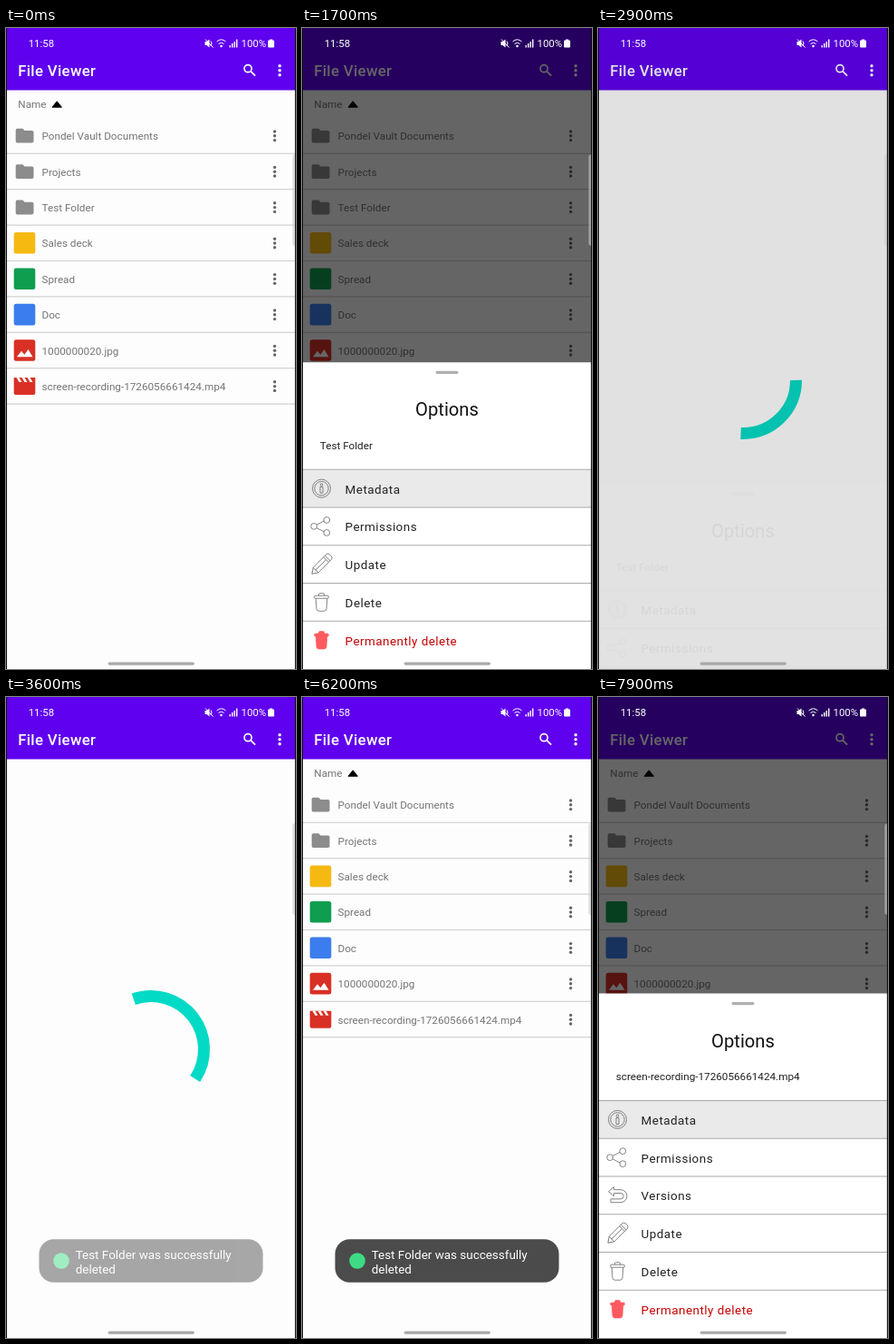
These frames come from a looping animation (320 px wide and 706 px high, 8 s). An HTML page:

```html
<!DOCTYPE html>
<html lang="en">
<head>
<meta charset="utf-8">
<title>File Viewer</title>
<style>
  html, body { margin: 0; width: 100%; height: 100%; overflow: hidden; background: #fdfdfd; }
  svg { display: block; width: 100vw; height: 100vh; }
  text { font-family: Roboto, sans-serif; font-size: 11.73px; white-space: pre; }
  .title { font-size: 16.8px; font-weight: 500; letter-spacing: .32px; }
  .status text { font-size: 11.4px; }
  .heading { font-size: 20.2px; text-anchor: middle; }
  .option { font-size: 13.45px; letter-spacing: .47px; }
  .toast text { font-size: 13.45px; }
  .line { fill: none; stroke: #777; stroke-width: .9; stroke-linejoin: round; }
</style>
</head>
<body>
<svg viewBox="0 0 320 706" preserveAspectRatio="none">
  <rect width="320" height="706" fill="#fdfdfd"/>
  <rect width="320" height="68.5" fill="#5f00ee"/>
  <g fill="#fff">
    <text class="title" x="13.2" y="53">File Viewer</text>
    <g fill="none" stroke="#fff" stroke-width="1.7">
      <circle cx="267" cy="44.7" r="4"/><path d="M270 47.7l5 5"/>
    </g>
    <g id="menu"></g>
  </g>
  <g id="fullList"></g>
  <g id="shortList"></g>
  <path id="spinner" fill="none" stroke="#03dac5" stroke-width="13"/>
  <rect id="scrim" width="320" height="706"/>
  <g id="folderSheet"></g>
  <g id="videoSheet"></g>

  <g id="toast" class="toast" fill="#fff">
    <rect x="36.5" y="597.3" width="247" height="47.5" rx="16" fill="#4b4b4b"/>
    <circle cx="61" cy="621" r="8.8" fill="#3ddc84"/>
    <text x="76.7" y="619">Test Folder was successfully</text>
    <text x="76.7" y="634.5">deleted</text>
  </g>

  <g class="status" fill="#fff">
    <text x="24.7" y="21">11:58</text>
    <text x="259.5" y="21">100%</text>
    <path d="M219.5 15h2l3-2.5v9l-3-2.5h-2z"/>
    <path d="M220 12.5l8.5 9M226 14.5q2 2.5 0 5M232.5 15q5-4.5 10 0M234.5 17.5q3-2.6 6 0" fill="none" stroke="#fff"/>
    <circle cx="237.5" cy="20" r="1.3"/>
    <path d="M246.5 19h1.4v2.5h-1.4zM249 17h1.4v4.5h-1.4zM251.5 15h1.4v6.5h-1.4zM254 12.5h1.4v9h-1.4z"/>
    <path d="M291 12.5h3v1h1.2q.8 0 .8.8v6.4q0 .8-.8.8h-5.4q-.8 0-.8-.8v-6.4q0-.8.8-.8h1.2z"/>
  </g>
  <rect x="316.7" y="139.5" width="5" height="100" rx="2" fill="#d8d8d8" stroke="#bbb" stroke-width=".7" opacity=".6"/>
  <rect x="112.5" y="698.4" width="95.5" height="3.4" rx="1.7" fill="#a9a9a9"/>
  <path d="M.5 0v706M319.4 0v706" stroke="#111" stroke-width="1.1"/>
</svg>

<script>
const LOOP = 8000, STEP = 100, ROW = 39.4, OPTION = 41.75, SLIDE = 141, DIM = 0.6;
const $ = id => document.getElementById(id);
const clamp = v => Math.min(1, Math.max(0, v));
const progress = (t, start, duration) => clamp((t - start) / duration);

const dots = (x, y, gap, r) =>
  [-gap, 0, gap].map(d => `<circle cx="${x}" cy="${y + d}" r="${r}"/>`).join('');
const tile = color => `<rect x="8.7" y="-12" width="23.6" height="23.6" rx="2.5" fill="${color}"/>`;

// File icons, centred vertically on 0
const fileIcons = {
  folder: '<path d="M12.5-8h6l2 2.2h8.2q1.8 0 1.8 1.8V6q0 1.8-1.8 1.8H12.5q-1.8 0-1.8-1.8V-6.2q0-1.8 1.8-1.8z" fill="#8c8c8c"/>',
  slides: tile('#f5b912'),
  sheet: tile('#0f9d50'),
  doc: tile('#3b7ded'),
  image: tile('#d93025') + '<path d="M12 7l5-6.5 3.3 4 4.2-5.6L29.5 7z" fill="#fff"/>',
  video: '<path d="M8.7-9.5h23.6V7.5q0 2-2 2H10.7q-2 0-2-2z" fill="#d93025"/>' +
    '<path d="M11.5-9.5h3l3 5h-3zM17.5-9.5h3l3 5h-3zM23.5-9.5h3l3 5h-3z" fill="#fff"/>'
};

const bin = 'M15-7.2h13q1.5 0 1.5 1.5t-1.5 1.5h-13q-1.5 0-1.5-1.5t1.5-1.5z' +
  'M18.5-7.2v-1.3q0-1.2 1.2-1.2h3.6q1.2 0 1.2 1.2v1.3M15.2-4.2l.8 11.5q.2 2.5 2.6 2.5h5.8q2.4 0 2.6-2.5l.8-11.5';
const optionIcons = {
  Metadata: '<g class="line"><circle cx="21.5" r="10"/><circle cx="21.5" r="7.7"/>' +
    '<path d="M20-1.8h3v6.8h-3z"/><circle cx="21.5" cy="-4.2" r="1.3"/></g>',
  Permissions: '<g class="line"><circle cx="13.2" r="3.4"/><circle cx="27.3" cy="-7" r="3.4"/>' +
    '<circle cx="27.3" cy="7" r="3.4"/><path d="M16.2-1.8l8-4M16.2 1.8l8 4"/></g>',
  Versions: '<path class="line" d="M11.5-4.2l6-5v3h7.5a7 7 0 0 1 0 14h-11v-3.8h11a3.2 3.2 0 0 0 0-6.4h-7.5v3.2z"/>',
  Update: '<path class="line" transform="translate(21.5 0) rotate(-45)" d="M-15 0l6-4h20q3 0 3 3v2q0 3-3 3h-20zM-9-4v8M7-4v8M9.5-4v8M-9 0h16"/>',
  Delete: `<path class="line" d="${bin}"/>`,
  'Permanently delete': `<path d="${bin}z" fill="#ff5a5f" stroke="#ff5a5f" stroke-width=".6"/>`
};

function listMarkup(files) {
  const rows = files.map(([icon, name], i) => `
    <g transform="translate(0 ${118.8 + i * ROW})">
      ${fileIcons[icon]}
      <text x="39.5" y="4.3" fill="#757575">${name}</text>
      <g fill="#666">${dots(296.5, 0, 4.8, 1.7)}</g>
      <rect x="1" y="18.9" width="318" height="1.2" fill="#d2d2d2"/>
    </g>`);
  return `<text x="13.3" y="88" fill="#757575">Name</text>
    <path d="M51 87.2l5.2-6.4 5.2 6.4z" stroke="#000" stroke-linejoin="round"/>` + rows.join('');
}

function sheetMarkup(name, options) {
  const top = 577 - options.length * OPTION;
  const rows = options.map((label, i) => `
    <g transform="translate(0 ${118 + i * OPTION})">
      ${label === 'Metadata' ? `<rect class="focus" width="320" height="${OPTION}" fill="#eaeaea"/>` : ''}
      ${label === 'Delete' ? `<g class="press" opacity="0"><rect width="320" height="${OPTION}" fill="#dcdcdc"/>
        <rect width="198" height="${OPTION}" fill="#d2d2d2"/></g>` : ''}
      <rect width="320" height="1" y="-.5" fill="#aaa"/>
      <g transform="translate(0 20.9)">
        ${optionIcons[label]}
        <text class="option" x="47.6" y="5.5" fill="${label.startsWith('Perman') ? '#c80000' : '#222'}">${label}</text>
      </g>
    </g>`);
  return `<g transform="translate(0 ${top})">
    <rect width="320" height="420" fill="#fff"/>
    <rect x="147.5" y="9.4" width="25" height="3.4" rx="1.7" fill="#b0b0b0"/>
    <text class="heading" x="160" y="59" fill="#111">Options</text>
    <text x="19.8" y="95.8" fill="#222">${name}</text>
    ${rows.join('')}</g>`;
}

const video = 'screen-recording-1726056661424.mp4';
const files = [
  ['folder', 'Pondel Vault Documents'], ['folder', 'Projects'], ['folder', 'Test Folder'],
  ['slides', 'Sales deck'], ['sheet', 'Spread'], ['doc', 'Doc'],
  ['image', '1000000020.jpg'], ['video', video]
];
const options = Object.keys(optionIcons);

$('menu').innerHTML = dots(302, 46.8, 5, 1.7);
$('fullList').innerHTML = listMarkup(files);
$('shortList').innerHTML = listMarkup(files.filter(([, name]) => name !== 'Test Folder'));
$('folderSheet').innerHTML = sheetMarkup('Test Folder', options.filter(o => o !== 'Versions'));
$('videoSheet').innerHTML = sheetMarkup(video, options);

const show = (id, on) => $(id).setAttribute('display', on ? 'inline' : 'none');
const fade = (id, value) => $(id).setAttribute('opacity', value);

// Steep S-curve with x handles .4 and .2, solved by bisection
function trimEase(x) {
  let low = 0, high = 1, s = 0.5;
  for (let i = 0; i < 20; i++) {
    s = (low + high) / 2;
    const at = 1.2 * s * (1 - s) ** 2 + 0.6 * s * s * (1 - s) + s ** 3;
    if (at < x) low = s; else high = s;
  }
  return s * s * (3 - 2 * s);
}

function drawSpinner(elapsed) {
  const u = elapsed / 1333 % 1;
  const turn = 56 + 90 * u + elapsed * 720 / 6665 - 90;
  const tail = turn + 270 * trimEase(clamp(u * 2 - 1));
  const head = turn + 270 * trimEase(clamp(u * 2)) + 1;
  const point = deg => {
    const a = deg * Math.PI / 180;
    return `${160 + 58.5 * Math.cos(a)} ${388 + 58.5 * Math.sin(a)}`;
  };
  $('spinner').setAttribute('d',
    `M${point(tail)}A58.5 58.5 0 ${head - tail > 180 ? 1 : 0} 1 ${point(head)}`);
}

function poseSheet(id, t, tap, closing) {
  const remaining = (1 - progress(t, tap + 50, 553)) ** 2;
  const leaving = closing ? progress(t, closing, 300) ** 2 : 0;
  const hidden = Math.max(remaining, leaving);
  show(id, hidden < 1);
  fade(id, 1 - hidden);
  $(id).setAttribute('transform', `translate(0 ${SLIDE * hidden})`);
  const pressed = closing && t >= closing;
  $(id).querySelector('.focus').setAttribute('opacity', pressed ? 0 : progress(t, tap + 600, 200));
  $(id).querySelector('.press').setAttribute('opacity', pressed ? 1 : 0);
}

function render(t) {
  const loading = t >= 2800 && t < 4300;
  show('fullList', t < 2800);
  show('shortList', t >= 4300);
  show('spinner', loading);
  if (loading) drawSpinner(t - 2707);

  poseSheet('folderSheet', t, 900, 2608);
  poseSheet('videoSheet', t, 6900);
  const dim = progress(t, 950, 744) - progress(t, 2655, 300) + progress(t, 6950, 744);
  fade('scrim', DIM * dim);
  fade('toast', progress(t, 3500, 208) - progress(t, 7350, 250));
}

function tick() {
  const t = performance.now() % LOOP;
  render(Math.floor(t / STEP) * STEP);
  requestAnimationFrame(tick);
}
tick();
</script>
</body>
</html>
```
